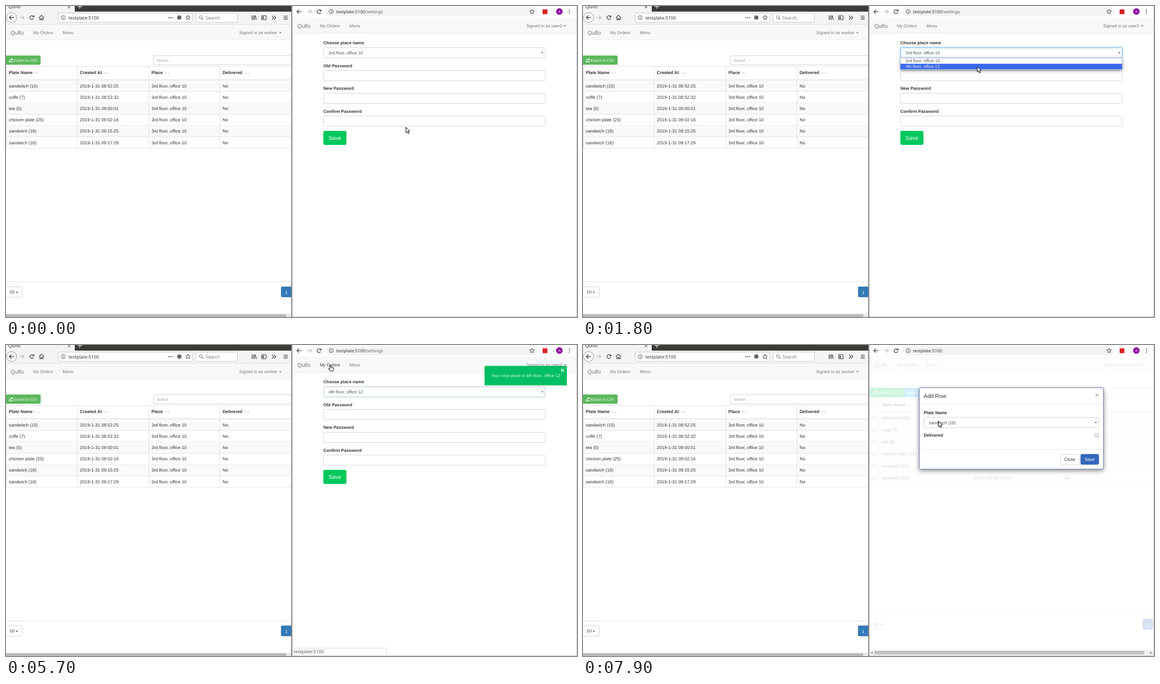
Animation, 1013 px wide and 553 px high, one loop 8000 ms. Source, as an HTML page with a canvas:

```html
<!DOCTYPE html>
<html lang="en">
<head>
<meta charset="utf-8">
<title>Place settings</title>
<style>
html, body { margin: 0; height: 100%; overflow: hidden; background: #fff; }
canvas { display: block; }
</style>
</head>
<body>
<canvas id="stage" width="1013" height="553"></canvas>
<script>
const c = document.getElementById('stage').getContext('2d');
const SANS = '"Liberation Sans", Arial, sans-serif', UI = '"Noto Sans", "Open Sans", sans-serif';
const BRAND = 'Qulfo', HOST = 'testplate:5100';
const PLACES = ['3rd floor, office 10', '4th floor, office 12'];
const ORDERS = [
  ['sandwitch (15)', '08:52:25'], ['coffe (7)', '08:52:32'], ['tea (5)', '09:00:01'],
  ['chicken plate (25)', '09:02:16'], ['sandwich (18)', '09:15:25'], ['sandwich (18)', '09:17:29']
].map(([plate, time]) => [plate, '2019-1-31 ' + time]);

// y is the middle of the text line
function text(s, x, y, { size = 7.7, color = '#333', bold = false, font = SANS, align = 'left' } = {}) {
  c.font = `${bold ? 'bold ' : ''}${size}px ${font}`;
  c.textRendering = 'geometricPrecision';
  c.textAlign = align;
  c.fillStyle = color;
  c.fillText(s, x, y + size * .35);
}
function rect(x, y, w, h, color) {
  c.fillStyle = color;
  c.fillRect(x, y, w, h);
}
function box(x, y, w, h, fill, stroke, r = 2.2, lw = .8) {
  c.beginPath();
  c.roundRect(x, y, w, h, r);
  paint(fill, stroke, lw);
}
function paint(fill, stroke, lw = 1) {
  if (fill) { c.fillStyle = fill; c.fill(); }
  if (stroke) { c.strokeStyle = stroke; c.lineWidth = lw; c.stroke(); }
}
function circle(x, y, r, fill, stroke, lw) {
  c.beginPath();
  c.arc(x, y, r, 0, 7);
  paint(fill, stroke, lw);
}
// points are offsets from x, y
function poly(x, y, pts, fill, stroke, lw) {
  c.beginPath();
  for (let i = 0; i < pts.length; i += 2) c.lineTo(x + pts[i], y + pts[i + 1]);
  if (fill) c.closePath();
  paint(fill, stroke, lw);
}
const caret = (x, y, color, w = 2.3) => poly(x, y, [-w, -w / 2, w, -w / 2, 0, w / 2], color);
function sorter(x, y) {
  caret(x, y - .3, '#ccc', 2);
  poly(x + 5, y, [-2, 1, 2, 1, 0, -1], '#ccc');
}
function arrow(x, y, dir, color) {
  poly(x, y, [-4 * dir, 0, 3.5 * dir, 0], null, color, 1.2);
  poly(x, y, [.4 * dir, -3.6, 4 * dir, 0, .4 * dir, 3.6], null, color, 1.2);
}
function reload(x, y) {
  c.beginPath();
  c.arc(x, y, 3.4, .5, 5.5);
  paint(null, '#444', 1.2);
  poly(x, y, [4.2, -4.2, 4.2, -.4, .4, -.4], '#444');
}
function info(x, y) {
  circle(x, y, 3.7, null, '#555', .9);
  rect(x - .5, y - .7, 1, 2.8, '#555');
  rect(x - .5, y - 2.2, 1, 1, '#555');
}
function star(x, y) {
  const pts = [];
  for (let i = 0; i < 11; i++) {
    const r = i % 2 ? 1.9 : 4.3, a = i * Math.PI / 5;
    pts.push(r * Math.sin(a), -r * Math.cos(a));
  }
  poly(x, y, pts, null, '#444', .9);
}
function lens(x, y) {
  circle(x - .8, y - .8, 2.6, null, '#777', 1);
  poly(x, y, [1, 1, 3.6, 3.6], null, '#777', 1.2);
}
function exportIcon(x, y) {
  poly(x, y, [-3, 0, -3, 3, 3, 3, 3, 1], null, '#fff', 1.1);
  poly(x, y, [-1.6, 1, -.2, -1.6, 1.4, -2], null, '#fff', 1.2);
  poly(x, y, [.8, -3.8, 4, -1.9, .8, .2], '#fff');
}
function checkbox(x, y) { box(x - 3, y - 3, 6, 6, '#f4f4f4', '#999', 1, .7); }
function pageSize(x, y, textX) {
  box(x, y, 28.5 + textX - x - 6.5, 18.5, '#fff', '#ccc');
  text('10', textX, y + 9.5);
  caret(textX + 12.7, y + 10, '#333', 2);
}
function select(x, y, w, value, border = '#ccc', glow) {
  c.save();
  if (glow) { c.shadowColor = 'rgba(102,175,233,.6)'; c.shadowBlur = 4; }
  box(x, y, w, 18.2, '#fff', border);
  c.restore();
  text(value, x + 9, y + 9.2, { color: '#555' });
  caret(x + w - 5, y + 9.2, '#222', 1.8);
}
function search(x, y) {
  box(x, y, 260, 16, '#fff', '#ccc', 1.6);
  text('Search', x + 5.7, y + 8.2, { size: 6.6, color: '#999' });
}

function navbar(x, y, h, user, userX, active) {
  rect(x, y, 506, h, '#f8f8f8');
  rect(x, y + h - .6, 506, .8, '#e7e7e7');
  const cy = y + h / 2 + .3, color = '#777';
  text(BRAND, x + 8, cy, { size: 9.9, color });
  text('My Orders', x + 48, cy, { color: active ? '#333' : color });
  text('Menu', x + 100.5, cy, { color });
  text('Signed in as ' + user, userX, cy, { color });
  caret(userX + (user.length > 5 ? 73 : 69), cy + .5, color);
}

// Rows of a table whose columns start at cols; pad shifts the text
function table({ x, w, top, head, step, cols, names, rows, size, fill }) {
  const y0 = top + head;
  rows.forEach((row, i) => {
    const y = y0 + i * step;
    if (i % 2 === 0) rect(x, y, w, step, '#f9f9f9');
    rect(x, y + step - .4, w, .8, '#ddd');
    row.forEach((s, j) => text(s, cols[j] + 4.6, y + step / 2, { size }));
  });
  rect(x, top - .4, w, .8, '#ddd');
  rect(x, y0 - 1, w, 1.2, '#ddd');
  names.forEach((s, j) => {
    text(s, cols[j] + 4.6, top + head / 2 - 1, { size: 7.8, bold: true });
    sorter(cols[j] + 4.6 + c.measureText(s).width + 5.5, top + head / 2 - .2);
  });
  for (const v of [fill, ...cols]) rect(v - .4, top, .8, head + step * rows.length, '#ddd');
}

function leftWindow() {
  rect(0, 0, 507, 553, '#fff');
  rect(0, 0, 507, 10, '#3c3b37');
  rect(0, 0, 122, 33, '#f5f4f2');
  rect(0, 10, 507, 23, '#f5f4f2');
  rect(0, 32.4, 507, .8, '#d5d3d0');
  text(BRAND, 4, 1.3, { size: 8.4, font: UI });
  poly(112, 1.5, [-2.3, -2.3, 2.3, 2.3], null, '#444', 1);
  poly(112, 1.5, [-2.3, 2.3, 2.3, -2.3], null, '#444', 1);
  rect(127, .5, 8, 1.2, '#ddd');
  rect(130.4, 0, 1.2, 5, '#ddd');

  circle(10, 20.5, 9, '#fafafa', '#999', .9);
  arrow(10, 20.5, -1, '#333');
  arrow(28, 20.5, 1, '#bbb');
  reload(46, 20.5);
  poly(63, 20.5, [-4.5, .4, 0, -4, 4.5, .4], null, '#444', 1.2);
  poly(63, 20.5, [-3, 0, -3, 4, -.8, 4, -.8, 1.5, .8, 1.5, .8, 4, 3, 4, 3, 0], null, '#444', 1.1);
  box(92.5, 12.5, 238.5, 16.5, '#fff', '#bbb', 1.5);
  info(101.5, 20.7);
  text(HOST, 110.7, 20.7, { size: 8.1, font: UI });
  for (const x of [289, 292.3, 295.6]) circle(x, 20.7, 1, '#444');
  circle(307.5, 20.5, 3.8, '#666');
  star(323, 20.7);
  box(337, 12.5, 73.5, 16.5, '#fff', '#bbb', 1.5);
  lens(346.5, 20.7);
  text('Search', 354, 20.7, { size: 8.1, color: '#777', font: UI });
  for (const x of [436, 438.3, 440.6]) rect(x, 16.7, 1.1, 8, '#444');
  poly(442, 17, [0, 0, 2.5, 7.7], null, '#444', 1.1);
  box(453.5, 17, 8, 7.5, null, '#444', 1, 1.1);
  rect(455, 18.5, 2.2, 4.5, '#444');
  for (const x of [472, 475.7]) poly(x, 20.7, [0, -3.3, 3, 0, 0, 3.3], null, '#444', 1.2);
  for (const y of [17.5, 20.2, 22.9]) rect(492.7, y, 7, 1.1, '#444');

  navbar(0, 33.2, 27.6, 'worker', 413.8);
  box(-1, 88.5, 62, 15.5, '#5cb85c', '#4cae4c', 1.6);
  exportIcon(8.7, 96.5);
  text('Export to CSV', 13.7, 96.6, { size: 6.6, color: '#fff' });
  search(261.5, 88.5);
  table({
    x: 0, w: 507, top: 107.5, head: 24.2, step: 20.2, size: 7.88, fill: .5,
    cols: [.4, 126.5, 253.4, 379.6], names: ['Plate Name', 'Created At', 'Place', 'Delivered'],
    rows: ORDERS.map(row => [...row, PLACES[0], 'No'])
  });
  rect(0, 490, 507, .8, '#ddd');
  pageSize(-5, 499.3, 6.5);
  box(488.3, 499.3, 30, 18, '#337ab7', '#2e6da4', 1.5);
  text('1', 497.5, 509, { color: '#fff', align: 'center' });
  rect(0, 547.5, 507, 5.5, '#e9e8e7');
  rect(0, 548, 497, 5, '#b9b9b9');
}

function rightChrome(path) {
  rect(506, 0, 507, 553, '#fff');
  arrow(520, 10, -1, '#444');
  arrow(538, 10, 1, '#bbb');
  reload(555.3, 10);
  box(567, 2, 376, 16.3, '#f1f3f4', null, 8.1);
  info(577, 10);
  text(HOST, 585.7, 10.2, { font: UI });
  const w = c.measureText(HOST).width;
  text(path, 585.7 + w, 10.2, { font: UI, color: '#666' });
  star(933.3, 10.2);
  rect(952, 6, 8.5, 8.5, '#d9221f');
  rect(971.6, 5, .8, 10, '#ddd');
  circle(981.7, 9.8, 5.8, '#8e0aa3');
  text('A', 981.7, 9.9, { size: 6, color: '#fff', font: UI, align: 'center' });
  for (const y of [6.7, 9.9, 13.1]) circle(999.5, y, .9, '#444');
}

function settingsPage(place, border, glow) {
  ['Choose place name', 'Old Password', 'New Password', 'Confirm Password'].forEach((label, i) => {
    const y = 65.6 + i * 40.45;
    text(label, 563, y, { bold: true });
    if (i) box(563.3, y + 8.7, 393.2, 18.2, '#fff', '#ccc');
  });
  select(563.3, 74.2, 393.2, place, border, glow);
  box(563, 222, 41, 25, '#00c85a', null, 3);
  text('Save', 583.5, 234.6, { size: 9.9, color: '#fff', align: 'center' });
}

function dropdown(chosen) {
  c.save();
  c.shadowColor = 'rgba(0,0,0,.4)';
  c.shadowBlur = 6;
  c.shadowOffsetY = 2;
  rect(563, 92.3, 393.5, 20.7, '#fff');
  c.restore();
  PLACES.forEach((place, i) => {
    const y = 92.7 + i * 10;
    if (i === chosen) rect(563, y, 393.5, 10, '#3a69f5');
    text(place, 572.3, y + 5, { color: i === chosen ? '#e4e9f6' : '#555' });
  });
  box(563, 92.5, 393.5, 20.4, null, '#8fa6d8', 0, .7);
}

function ordersPage(hover) {
  box(508, 76, 62, 17, '#0cc863', null, 1.6);
  rect(569.5, 76, 34.5, 17, hover ? '#08a2de' : '#1cb6ec');
  box(603.7, 76, 39, 17, '#f9b03f', null, 1.6);
  const white = { size: 6.6, color: '#fff' };
  exportIcon(517.5, 84.5);
  text('Export to CSV', 522.7, 84.7, white);
  rect(575.8, 83.8, 6, 1.5, '#fff');
  rect(578, 81.5, 1.5, 6, '#fff');
  text('New', 584, 84.7, white);
  box(610.3, 82.5, 4, 5.3, null, '#fff', .5, .9);
  rect(609.3, 81, 6, 1, '#fff');
  text('Delete', 616.7, 84.7, white);
  search(768.3, 76.7);
  table({
    x: 508, w: 503, top: 96.3, head: 22.8, step: 21.3, size: 7.7, fill: 508.7,
    cols: [525.5, 687.4, 849.4], names: ['Plate Name', 'Created At', 'Delivered'],
    rows: ORDERS.map(row => [...row, 'No'])
  });
  rect(1010.6, 96, .8, 151, '#ddd');
  checkbox(517.3, 106.8);
  ORDERS.forEach((_, i) => checkbox(517.3, 130 + i * 21.3));
  rect(508, 478.7, 503, .8, '#ddd');
  pageSize(508.7, 487.3, 515.3);
  box(993, 487.5, 18, 18, '#3469ba', '#2e5ea8', 1.8);
  text('1', 1002, 497, { color: '#fff', align: 'center' });
}

function scrollbar() {
  rect(508, 542.7, 504, 9, '#f1f1f1');
  rect(517, 543.7, 478.5, 6.6, '#c1c1c1');
  poly(512.5, 547.2, [1, -2, 1, 2, -1.3, 0], '#555');
  poly(1007.5, 547.2, [-1, -2, -1, 2, 1.3, 0], '#555');
}

function modal() {
  rect(508, 20.5, 504, 522, 'rgba(255,255,255,.8)');
  c.save();
  c.shadowColor = 'rgba(0,0,0,.45)';
  c.shadowBlur = 8;
  c.shadowOffsetY = 3;
  box(596.5, 75.8, 327, 145, '#fff', null, 3);
  c.restore();
  box(596.5, 75.8, 327, 145, '#fff', '#6878a0', 3, 1);
  text('Add Row', 604.3, 90.7, { size: 9.9 });
  text('×', 911.5, 89.3, { size: 11.5, color: '#aaa', bold: true, align: 'center' });
  for (const y of [105, 185]) rect(597, y, 326, .8, '#e8e8e8');
  text('Plate Name', 604.4, 120.3, { bold: true });
  select(604.8, 128.7, 310, 'sandwich (18)');
  text('Delivered', 604.4, 160.7, { bold: true });
  checkbox(911.3, 160.5);
  box(847, 194.3, 33.5, 18, '#fff', '#ccc');
  text('Close', 863.7, 203.5, { align: 'center' });
  box(883, 194.3, 32, 18, '#3468bd', '#2d5ca8');
  text('Save', 899, 203.5, { color: '#fff', align: 'center' });
}

function toast() {
  rect(849, 37.2, 146, 34.6, '#00bf62');
  text('Your new place is ' + PLACES[1], 922, 54.4, { color: '#d9f5e6', align: 'center' });
  text('×', 987.3, 45, { size: 12, color: '#fff', bold: true, align: 'center' });
}

function statusBubble(label) {
  box(506, 539, 169, 18, '#fff', '#ccc', 2);
  text(label, 510, 545.5, { size: 8.1, color: '#555', font: UI });
}

const steps = (t, start, n) => Math.max(0, Math.min(n, Math.floor((t - start) / 100))) / n;
const STOPS = [
  [3500, 829, 267], [4200, 678, 152], [4400, 595, 82], [4600, 588, 74], [5000, 576, 36.5],
  [6500, 582.5, 78], [7300, 582, 80], [7500, 594, 116], [7900, 630, 135]
];
function pointer(t) {
  if (t < 1300) { const k = steps(t, 100, 7); return [709 + 12 * k, 215 - 135 * k]; }
  if (t < 3500) { const k = steps(t, 1300, 5); return [721 - 22 * k, 80 + 27 * k]; }
  return STOPS.findLast(s => s[0] <= t).slice(1);
}
function drawPointer(x, y, hand) {
  c.lineJoin = 'round';
  if (hand) poly(x, y, [-1, 0, .7, 0, .8, 3.3, 4.8, 4, 5.2, 6, 4, 9.5, -1.4, 9.5, -4, 5.8, -3, 4.8, -1.2, 6], '#fff', '#111', 1);
  else poly(x, y, [.5, .5, .5, 10.3, 2.7, 8.4, 4.3, 12, 6, 11.2, 4.5, 7.8, 7.4, 7.5], '#fff', '#111', 1);
  c.lineJoin = 'miter';
}

function draw(t) {
  const orders = t >= 6000, open = t >= 1300 && t < 3500, focus = t >= 1300 && t < 5700;
  const [x, y] = pointer(t);
  leftWindow();
  rightChrome(orders ? '' : '/settings');
  navbar(508.7, 20.8, 28.2, 'user0', 923, t >= 5000 && t < 7000);
  if (orders) {
    ordersPage(t >= 6800 && t < 7300);
    scrollbar();
    if (t >= 7300) modal();
  } else {
    settingsPage(PLACES[t < 3500 ? 0 : 1], focus ? '#66afe9' : t < 1300 ? '#ccc' : '#9db9d2', focus);
    if (open) dropdown(y > 102 ? 1 : 0);
  }
  if (t >= 3500 && t < 7900) toast();
  if (t >= 5300 && t < 6800) statusBubble(t < 6500 ? HOST : '');
  rect(506.2, 0, 1.6, 553, '#6b6b6b');
  rect(1012, 0, 1, 553, '#ccc');
  rect(508, 552, 505, 1, '#ccc');
  drawPointer(x, y, t >= 5000 && t < 7300);
}

const start = performance.now();
(function tick() {
  draw((performance.now() - start) % 8000);
  requestAnimationFrame(tick);
})();
</script>
</body>
</html>
```
